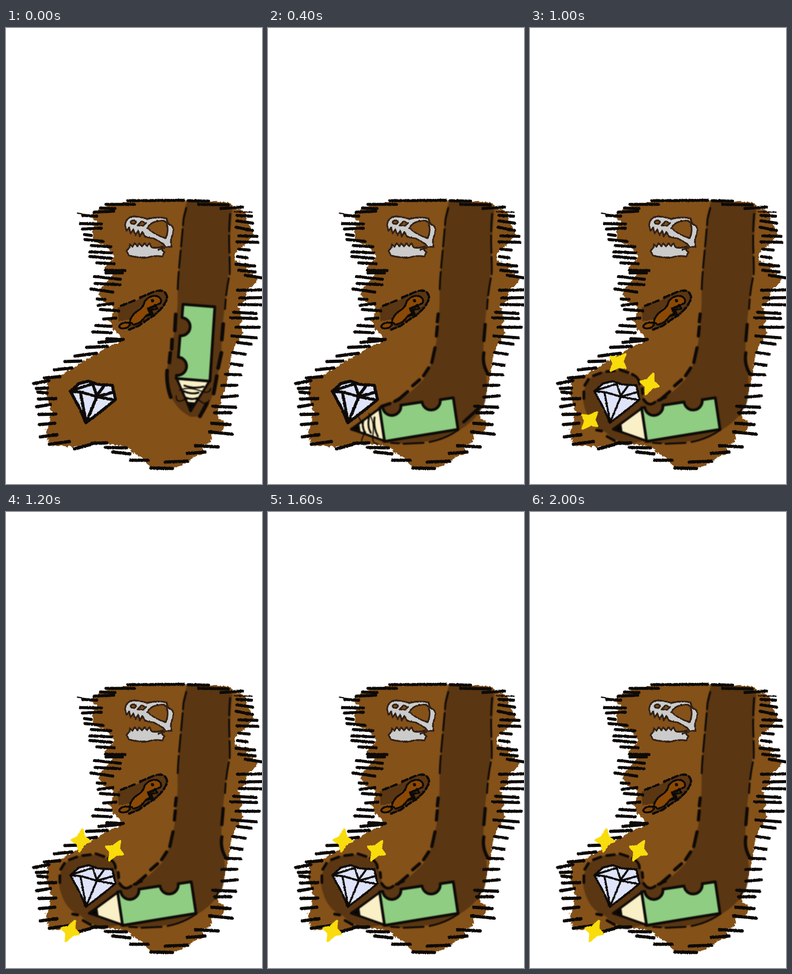
These frames come from a looping animation (561 px wide and 998 px high, 2200 ms). An HTML page:

```html
<!DOCTYPE html>
<html lang="en">
<head>
<meta charset="utf-8">
<title>Digging pencil</title>
<style>
  html, body { margin: 0; width: 100%; height: 100%; overflow: hidden; background: #fff; }
  svg { display: block; width: 100%; height: 100%; }
  .line { fill: none; stroke: #0d0a07; stroke-linecap: round; stroke-linejoin: round; }
  .dark { fill: #5a3612; }
  .earth { fill: #845119; }
  .ink { stroke: #0d0a07; stroke-linecap: round; stroke-linejoin: round; }
</style>
</head>
<body>
<svg viewBox="0 0 561 998">
  <defs>
    <filter id="ragged" filterUnits="userSpaceOnUse" x="0" y="0" width="561" height="998" color-interpolation-filters="sRGB">
      <feTurbulence type="fractalNoise" baseFrequency=".16" numOctaves="2" seed="4"/>
      <feDisplacementMap in="SourceGraphic" scale="9" xChannelSelector="R" yChannelSelector="G"/>
    </filter>
    <filter id="chalk" filterUnits="userSpaceOnUse" x="0" y="0" width="561" height="998" color-interpolation-filters="sRGB">
      <feTurbulence type="fractalNoise" baseFrequency=".3" numOctaves="2" seed="9"/>
      <feDisplacementMap in="SourceGraphic" scale="3" xChannelSelector="R" yChannelSelector="G"/>
      <feGaussianBlur stdDeviation=".4"/>
    </filter>
    <filter id="soft" filterUnits="userSpaceOnUse" x="0" y="0" width="561" height="998" color-interpolation-filters="sRGB">
      <feGaussianBlur stdDeviation=".9"/>
    </filter>
    <g id="diamond">
      <path d="M141 795L160 778 181 773 202 780 233 782 240 813 207 840 175 864 162 833Z"/>
      <path fill="none" d="M141 795L165 797L199 807L235 797M148 792L190 779L199 805L214 784M163 797L175 860M199 807L177 860M199 807L238 814"/>
    </g>
  </defs>

  <path class="earth" filter="url(#ragged)" d="M185 414L206 396 228 388 266 380 390 376 445 379 490 382 503 394 525 402 528 418 537 440 543 452 530 468 517 480 503 492 501 510 538 519 526 530 552 546 545 560 528 575 525 595 510 610 518 640 510 652 520 667 510 682 500 700 493 720 489 750 480 790 470 820 465 838 467 855 485 868 470 885 450 891 450 905 430 915 433 930 410 940 390 955 360 965 315 963 305 945 280 930 262 915 240 912 200 908 150 917 120 915 95 914 88 880 94 870 100 840 90 810 90 780 95 765 125 757 160 735 195 715 225 697 258 683 235 660 228 640 240 615 215 600 202 580 216 560 235 540 215 525 237 500 225 480 190 465 190 440 200 425Z"/>

  <!-- tunnel -->
  <g filter="url(#soft)">
    <g class="dark">
      <path data-steps="0" d="M397 378L388 410C384 480 375 540 376 600C374 680 347 735 352 780Q365 832 405 851L428 850C452 825 462 770 473 715C470 680 478 620 484 570C492 510 488 470 496 400L488 384Z"/>
      <path data-steps="1-10" d="M397 378L388 410C384 480 375 540 376 600C374 680 362 750 335 775Q305 805 280 823L262 890Q300 902 335 897Q420 880 472 830Q486 790 474 740C468 700 478 620 484 570C492 510 488 470 496 400L488 384Z"/>
      <path data-steps="2-10" d="M300 805L245 829L250 908Q350 916 412 884Q455 862 472 825L400 760Z"/>
      <path data-steps="4-10" d="M117 820C115 780 132 754 170 751C215 744 242 770 247 797Q249 818 262 823L265 900L220 910Q185 905 165 884Q128 872 117 820Z"/>
    </g>
    <g class="line">
      <g stroke-width="4" stroke-dasharray="38 9">
        <path d="M395 394L389 418C384 480 380 510 377 555L376 580"/>
        <path d="M491 407C486 465 492 510 490 540Q482 575 480 615"/>
      </g>
      <g data-steps="0" stroke-width="8">
        <path d="M372 627L370 662M364 682L363 702M360 711L358 732M353 750Q351 780 361 808M476 648L473 682M472 711L465 744M462 762L455 800M440 822L425 850"/>
      </g>
      <g data-steps="1-10" stroke-width="7">
        <path d="M373 626L371 643M371 654L369 674M366 700L359 732M352 744L341 761M332 770L317 783M306 796L285 814"/>
        <path d="M476 649L473 684M473 711Q469 735 481 755"/>
      </g>
      <path data-steps="1" stroke-width="7" stroke-dasharray="24 12" d="M338 904Q400 885 466 833"/>
      <path data-steps="2-3" stroke-width="7" d="M290 810L278 817M267 822L249 828M429 862L462 832"/>
      <path data-steps="2-10" stroke-width="4" d="M270 908L287 909M297 910L341 908M354 906Q390 899 416 880"/>
      <path data-steps="4-10" stroke-width="6" d="M118 811L118 796M120 782L128 769M139 761L155 755M168 752L185 750M197 748L215 754M224 758Q240 766 240 779M246 789L247 800M249 813Q260 830 274 819M281 815L297 808M146 880L157 882M169 894L185 903M194 907L215 910"/>
      <path data-steps="4-10" stroke-width="3" d="M467 826L459 847"/>
    </g>
  </g>

  <g filter="url(#chalk)">
    <!-- skull -->
    <g class="ink" fill="#cbcbcb" style="stroke:#302016" stroke-width="3.5">
      <path d="M261 432Q262 417 275 413Q286 411 310 418Q335 412 352 417Q353 430 363 432Q370 440 364 455Q359 466 363 479L350 479L344 472L325 461L305 457L299 446 293 456 290 443 284 453 279 441 273 450 270 437 264 444Z"/>
      <path d="M264 488L271 480 271 473 277 479 282 471 288 478 292 471 298 478 304 471 309 478 314 471 319 480Q330 483 344 478Q339 486 347 490L343 500Q325 497 312 502Q285 503 270 498Z"/>
      <g class="earth">
        <path d="M310 438Q316 425 335 422Q348 420 351 426Q358 440 350 460Q326 453 310 438Z"/>
        <ellipse cx="279" cy="425" rx="6" ry="4"/>
        <path d="M288 432L297 423L307 427L300 433Z"/>
      </g>
      <path fill="none" d="M334 485L347 481"/>
    </g>

    <!-- burrow -->
    <path class="dark" d="M245 612L285 596L325 577Q350 572 353 590Q350 608 325 628L274 660L247 655Z"/>
    <path class="earth" d="M246 642L270 638L285 620L300 604L279 645L270 657L246 655Z"/>
    <path class="line" stroke-width="5" stroke-dasharray="13 6" d="M252 608L285 595M294 590L317 580Q350 566 353 590Q350 608 325 628L290 652L270 660"/>
    <g class="ink" fill="#8b4905" stroke-width="4">
      <ellipse cx="260" cy="651" rx="12" ry="6" transform="rotate(-15 260 651)"/>
      <path d="M271 643Q275 628 287 620Q302 611 304 598Q314 585 329 586Q343 591 339 602L326 607L332 614L318 617L322 627L306 630Q296 647 279 649Z"/>
      <path class="line" stroke-width="6" d="M328 608L312 614L317 626L307 630"/>
      <circle cx="321" cy="597" r="1.5"/>
    </g>

    <g class="ink" fill="#dfe4fb">
      <use href="#diamond" data-steps="0-3" stroke-width="6.5"/>
      <use href="#diamond" data-steps="4-10" stroke-width="4.5"/>
    </g>
  </g>

  <!-- pencil, with the base of its cone at the origin -->
  <g filter="url(#soft)">
    <g id="pencil" class="ink" stroke-width="6">
      <path fill="#f9f0c8" stroke-width="5" d="M0 -36L-68 0L0 36Z"/>
      <path d="M-68 0L-52 -7L-52 7Z"/>
      <path fill="#8fcd83" d="M0 -37H7A20 20 0 0 0 47 -36H94A20 20 0 0 0 134 -35H163V35L0 37Z"/>
      <g data-steps="0-2" class="line">
        <path stroke-width="4" d="M-14 -18Q-20 4 -13 24M-26 -20Q-33 0 -27 14M-40 -13Q-45 0 -39 12"/>
        <path stroke-width="2.5" d="M-38 -34Q-52 -34 -48 -22Q-34 4 -48 24Q-54 36 -42 38M-25 -28Q-14 -8 -24 22Q-28 38 -16 40"/>
      </g>
    </g>
  </g>

  <!-- fur -->
  <g class="line" filter="url(#chalk)" stroke-width="6.5">
    <path d="M219 386l62 0M207 394l32 1M193 403l43 -2M168 410l31 2M163 428l46 1M168 440l41 -2M172 452l15 2M173 463l40 4M187 476l43 3M184 490l48 2M184 500l47 4M199 514l38 2M218 530l43 1M219 536l36 0M194 544l57 6M195 559l55 3M186 571l48 7M200 593l17 1M202 607l33 -4M207 616l40 3M214 637l27 -2M197 651l34 2M190 665l41 2"/>
    <path stroke-width="7" d="M221 680l36 2M204 688l45 -4M177 699l45 -2M151 718l47 -6M129 730l35 -1M106 748l38 -4M84 766l34 -3M61 778l33 -6M67 789l24 -1M70 797l20 2M71 812l38 -1M67 829l30 -5M72 846l37 -1M73 868l34 -3M75 895l37 -5M95 911l44 -6M150 921l37 -10M188 909l33 -1M218 918l46 1M234 928l38 4M273 946l38 0M317 963l48 1M349 950l49 -2M397 931l39 -3M415 914l50 3M446 884l50 5M451 865l40 3M457 842l36 0M453 828l50 2"/>
    <path d="M473 808l34 -3M473 782l33 0M481 758l33 1M493 735l24 3M496 710l28 4M507 688l30 4M495 674l54 4M504 655l51 0M492 634l57 2M499 622l49 3M512 605l49 1M512 591l49 -1M507 574l54 -1M524 541l37 6M510 530l36 4M504 517l41 4M507 500l21 3M510 484l23 2M506 468l46 1M510 455l40 1M504 436l36 7M506 422l34 5M506 410l32 2M471 395l47 -3M422 386l65 1M399 378l45 1M267 378l122 -1"/>
    <path stroke-width="2.5" d="M156 405l12 2M500 402l39 1"/>
  </g>
  <g id="stars" filter="url(#chalk)" fill="#f9dc0c" stroke="#f9dc0c" stroke-width="5" stroke-linejoin="round"></g>
</svg>
<script>
const STEP = 200, STEPS = 11;
const poses = [[410, 770, -85.5], [317, 855, -31], [250, 868, -8.5]];

// x, y, rotation of each sparkle
const far = [[193, 732, 42], [262, 779, 20], [131, 859, 42]];
const high = [[164, 719, 8], [238, 741, 30], [141, 917, 24]];
const low = [[185, 753, -4], [252, 837, 6], [127, 882, 35]];
const sparkles = { 5: far, 6: high, 7: low, 8: high, 9: low, 10: high };

const pencil = document.getElementById("pencil");
const stars = document.getElementById("stars");
const staged = [...document.querySelectorAll("[data-steps]")].map(node => {
  const [first, last = first] = node.dataset.steps.split("-").map(Number);
  return { node, first, last };
});

const star = ([x, y, turn]) =>
  `<path transform="translate(${x} ${y}) rotate(${turn})" d="M0 -24L6 -8L20 -2L8 6L0 24L-6 8L-20 2L-8 -6Z"/>`;

function show(step) {
  for (const { node, first, last } of staged)
    node.style.display = step >= first && step <= last ? "" : "none";
  const [x, y, turn] = poses[Math.min(step, poses.length - 1)];
  pencil.setAttribute("transform", `translate(${x} ${y}) rotate(${turn})`);
  stars.innerHTML = (sparkles[step] || []).map(star).join("");
}

let shown = -1;
function tick() {
  const step = Math.floor(performance.now() / STEP) % STEPS;
  if (step !== shown) show(shown = step);
  requestAnimationFrame(tick);
}
tick();
</script>
</body>
</html>
```
